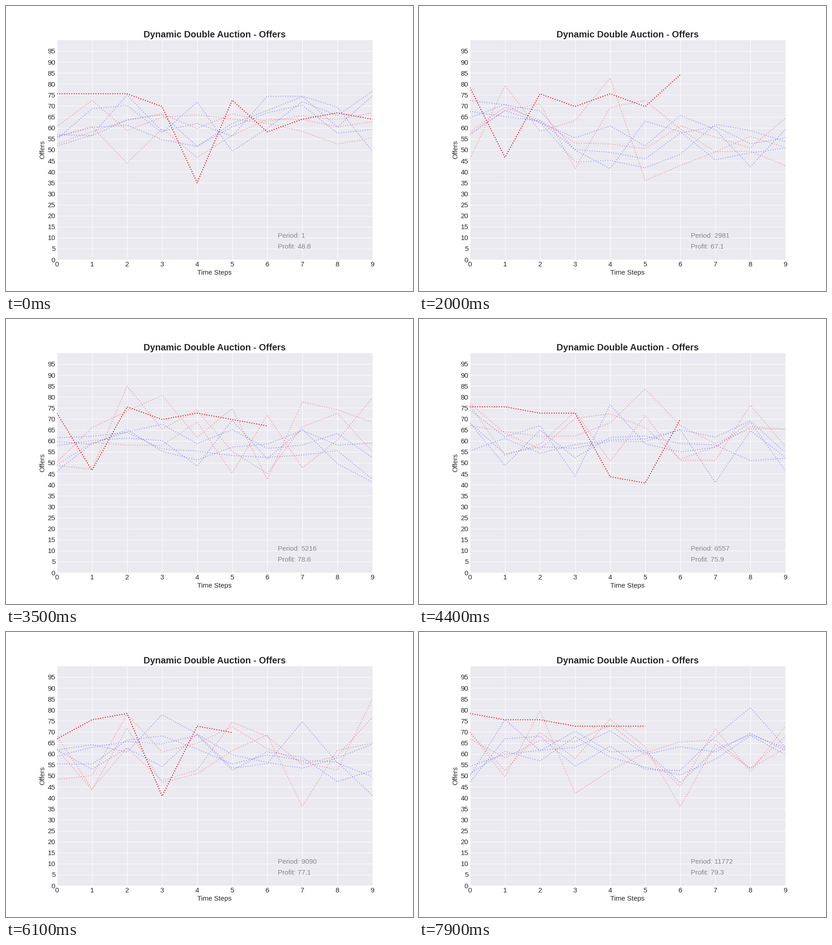
Recreate the animation shown at these times as a matplotlib script. Size 894 by 626 pixels, loop 8 s.

```python
import numpy as np
import matplotlib.pyplot as plt
from matplotlib.animation import FuncAnimation

FRAMES, INTERVAL = 80, 100
W, H, DPI = 894, 626, 72
PERIODS_PER_FRAME = 149
STEPS = np.arange(10)
INK = "0.15"
PRICES = np.linspace(35, 90, 20)   # price levels open to the agent


def offers(rng, count, mean, swing, noise, low, high):
    """Offers that share a market swing and add individual noise."""
    shared = swing * rng.standard_normal(10)
    own = noise * rng.standard_normal((count, 10))
    return np.clip(mean + shared + own, low, high)


def agent(rng, progress):
    """Prices of one run: wild at first, then a calm slide from a high ask."""
    explore = 0.65 - 0.5 * progress
    top = int(20 - 3 * progress)
    count = rng.integers(6, int(11 - 3 * progress))
    levels = []
    for step in range(count):
        if rng.random() < explore:
            levels.append(rng.integers(0, top))
        else:
            habit = 14.3 - 0.35 * step + 0.7 * rng.standard_normal()
            levels.append(int(np.clip(round(habit), 0, top - 1)))
    return PRICES[levels]


def profit(rng, progress):
    return 62 + 18 * progress + (14 - 8 * progress) * rng.uniform(-1, 1)


plt.rcParams.update({
    "font.family": "Liberation Sans",
    "font.size": 15,
    "text.color": INK,
    "axes.labelcolor": INK,
    "xtick.color": INK,
    "ytick.color": INK,
})

fig = plt.figure(figsize=(W / DPI, H / DPI), dpi=DPI, facecolor="white")
ax = fig.add_axes([111.78 / W, 68.9 / H, 693.04 / W, 482.33 / H],
                  facecolor="#EAEAF0")
ax.set(xlim=(0, 9), ylim=(0, 100), xticks=STEPS, yticks=range(0, 100, 5))
ax.set_title("Dynamic Double Auction - Offers", fontsize=20,
             fontweight="bold", pad=6)
ax.set_xlabel("Time Steps", labelpad=4)
ax.set_ylabel("Offers", labelpad=4)
ax.tick_params(length=0, pad=3.5)
ax.grid(color="white", linewidth=1)
ax.set_axisbelow(True)
ax.spines[:].set_visible(False)


def dotted(color, alpha=1):
    return ax.plot([], [], ":", color=color, alpha=alpha, linewidth=2)[0]


buyer_lines = [dotted("blue", 0.3) for _ in range(4)]
seller_lines = [dotted("red", 0.3) for _ in range(3)]
agent_line = dotted("red")
period_text = ax.text(6.3, 10, "", alpha=0.5)
profit_text = ax.text(6.3, 5, "", alpha=0.5)


def update(k):
    rng = np.random.default_rng(k)
    progress = k / (FRAMES - 1)
    sellers = offers(rng, 3, 61, 6, 9, 36, 85)
    buyers = offers(rng, 4, 59, 3.5, 6.5, 41, 82)
    for line, y in zip(seller_lines + buyer_lines, [*sellers, *buyers]):
        line.set_data(STEPS, y)
    path = agent(rng, progress)
    agent_line.set_data(STEPS[:len(path)], path)
    period_text.set_text(f"Period: {1 + PERIODS_PER_FRAME * k}")
    profit_text.set_text(f"Profit: {profit(rng, progress):.1f}")
    return [*seller_lines, *buyer_lines, agent_line, period_text, profit_text]


anim = FuncAnimation(fig, update, frames=FRAMES, interval=INTERVAL,
                     repeat=True, repeat_delay=0)
plt.show()
```
